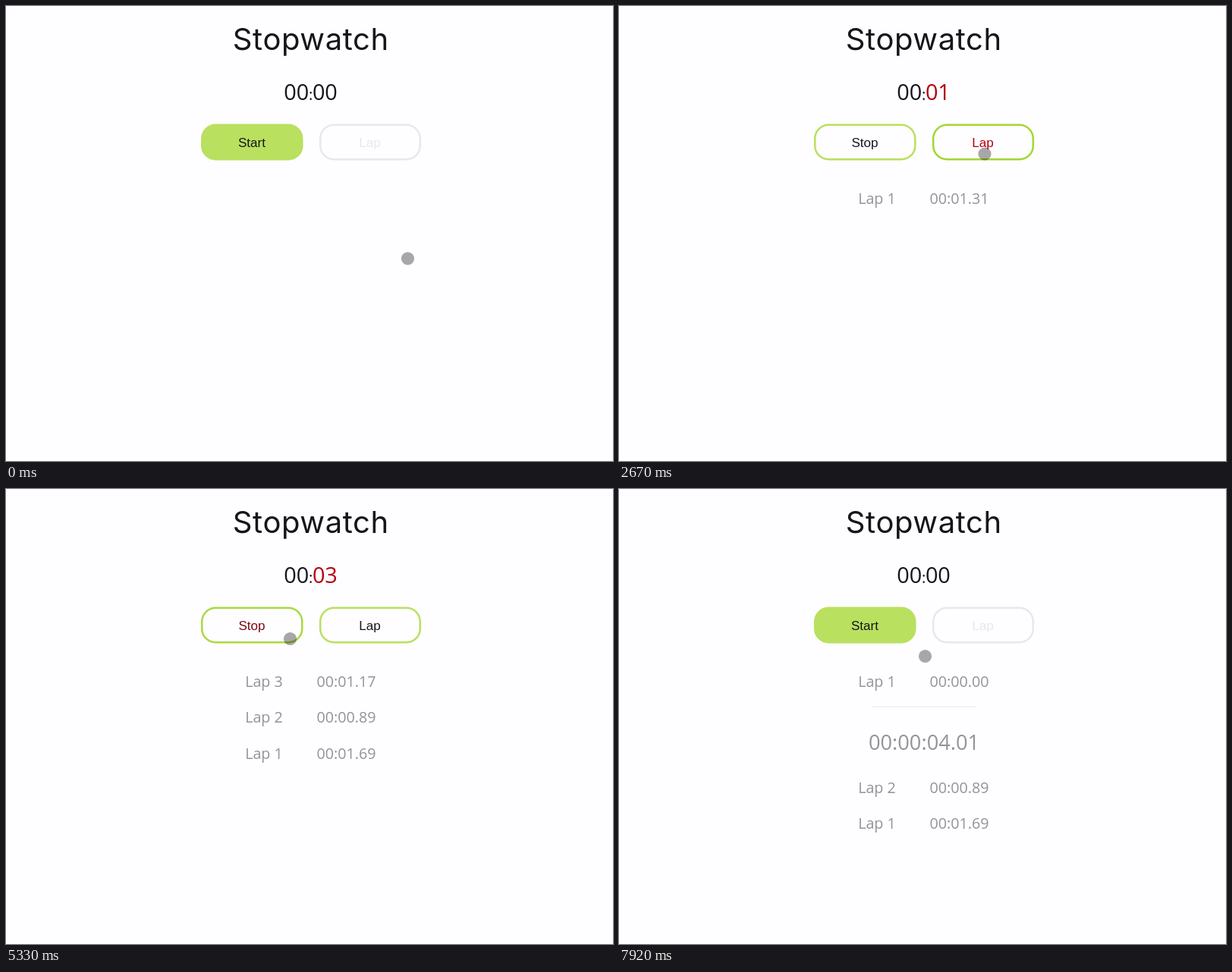
An HTML page for the animation above (8000 ms loop, 800 by 600 pixels).

```html
<!DOCTYPE html>
<html lang="en">
<head>
<meta charset="utf-8">
<title>Stopwatch</title>
<style>
  html, body { margin: 0; width: 100%; height: 100%; overflow: hidden; background: #fefdff; }
  svg { display: block; width: 800px; height: 600px; }
  text { font-family: "Open Sans", "Noto Sans", sans-serif; fill: #16151a; white-space: pre; }
  .title { font: 400 40px Inter, sans-serif; letter-spacing: .015em; text-anchor: middle; }
  .clock { font-size: 28.8px; }
  .colon { font-size: 20px; }
  .button rect { stroke-width: 2.5; }
  .button text { font: 17.1px "Liberation Sans", Arial, sans-serif; text-anchor: middle; }
  .laps text { font-size: 19.7px; fill: #949397; }
  .laps .total { font-size: 27.2px; }
</style>
</head>
<body>
<svg viewBox="0 0 800 600">
  <rect width="800" height="600" fill="#fefdff"/>
  <rect x="799" width="1" height="600" fill="#f7f6f9"/>
  <text class="title" x="401.8" y="58">Stopwatch</text>

  <text class="clock" x="366.3" y="124">00</text>
  <text class="colon" x="399" y="124">:</text>
  <text class="clock" id="seconds" x="403.9" y="124">00</text>

  <g class="button" id="main">
    <rect x="258.25" y="156.75" width="132" height="45.4" rx="18"/>
    <text x="324" y="185.6"></text>
  </g>
  <g class="button" id="side">
    <rect x="414.2" y="156.75" width="131.6" height="45.4" rx="18"/>
    <text x="479.6" y="185.6"></text>
  </g>

  <g class="laps">
    <g class="row"><text x="315.2"></text><text x="409.6"></text></g>
    <g class="row"><text x="315.2"></text><text x="409.6"></text></g>
    <g class="row"><text x="315.2"></text><text x="409.6"></text></g>
    <g id="summary">
      <rect x="334" y="286.5" width="136" height="1.2" fill="#ecebef"/>
      <text class="total" x="329" y="344">00:00:04.01</text>
    </g>
  </g>
  <circle id="pointer" r="8.6"/>
</svg>

<script>
const LOOP = 8000, FPS = 12, FADE = 300;
const START = 1228, STOP = 5605, RESET = 7010, RATE = 0.915;
const LAPS = [1.69, 0.89, 1.42];
const ROW_TOP = 260.5, ROW_GAP = 47.6, SUMMARY_HEIGHT = 92.4;

const PAPER = [254, 253, 255], INK = [22, 21, 26], RED = [178, 0, 14], PALE = [232, 231, 235];
const LIGHT = [185, 224, 95], HOVER = [164, 214, 50], PRESS = [149, 188, 44];

// A look is [fill, edge, ink].
const looks = {
  idle: [LIGHT, LIGHT, INK],
  hover: [HOVER, HOVER, INK],
  press: [PRESS, PRESS, INK],
  outline: [PAPER, LIGHT, INK],
  outlineHover: [PAPER, HOVER, RED],
  disabled: [PAPER, PALE, PALE]
};

// Each button fades to a new look from the given time on.
const mainStates = [
  [0, "idle"], [750, "hover"], [1000, "press"], [START + 30, "outlineHover"],
  [1740, "outline"], [5150, "outlineHover"], [STOP, "hover"], [5950, "idle"]
];
const sideStates = [
  [0, "disabled"], [START + 30, "outline"], [2100, "outlineHover"], [3250, "outline"],
  [3550, "outlineHover"], [4350, "outline"], [STOP, "idle"], [6300, "hover"], [RESET, "disabled"]
];

// The pointer rests between moves; dip bends a move downwards.
const home = { x: 529.5, y: 333 };
const moves = [
  { from: 70, to: 1000, x: 373.5, y: 194.3, dip: 0 },
  { from: 1700, to: 2270, x: 482, y: 195, dip: 28 },
  { from: 3180, to: 3330, x: 491.5, y: 205.5, dip: 0 },
  { from: 3450, to: 3650, x: 482, y: 195, dip: 0 },
  { from: 4250, to: 5320, x: 374.5, y: 197.5, dip: 12 },
  { from: 5850, to: 6650, x: 452, y: 197.5, dip: 14 },
  { from: 7050, to: 7400, x: 424.5, y: 227.5, dip: 0 },
  { from: 7590, to: 7910, x: 403.5, y: 220.5, dip: 0 }
];

const $ = id => document.getElementById(id);
const mix = (a, b, k) => a + (b - a) * k;
const mixColor = (a, b, k) => a.map((v, i) => mix(v, b[i], k));
const rgb = color => `rgb(${color.map(Math.round)})`;
const pad = n => String(n).padStart(2, "0");

function ease(t, from, to) {
  const k = Math.max(0, Math.min(1, (t - from) / (to - from)));
  return k * k * (3 - 2 * k);
}

function lookAt(states, t) {
  return states.reduce((look, [time, name]) => {
    const k = ease(t, time, time + FADE);
    return look.map((color, i) => mixColor(color, looks[name][i], k));
  }, looks[states[0][1]]);
}

function pointerAt(t) {
  return moves.reduce((at, move) => {
    const k = ease(t, move.from, move.to);
    return {
      x: mix(at.x, move.x, k),
      y: mix(at.y, move.y, k) + move.dip * Math.sin(Math.PI * k)
    };
  }, home);
}

function lapTime(seconds) {
  const hundredths = Math.floor(seconds * 100 + 1e-6);
  return `00:${pad(Math.floor(hundredths / 100))}.${pad(hundredths % 100)}`;
}

function lapEntries(t, elapsed) {
  if (t < START) return [];
  const entries = [];
  let left = elapsed;
  for (let i = 0; i < LAPS.length && left >= 0; i++) {
    entries.unshift({ n: i + 1, time: Math.min(left, LAPS[i]) });
    left -= LAPS[i];
  }
  if (t >= RESET) entries[0] = { n: 1, time: 0 };
  return entries;
}

function drawButton(id, label, states, t) {
  const [box, text] = $(id).children;
  const [fill, edge, ink] = lookAt(states, t).map(rgb);
  box.setAttribute("fill", fill);
  box.setAttribute("stroke", edge);
  text.style.fill = ink;
  text.textContent = label;
}

const rows = [...document.querySelectorAll(".row")];

function drawLaps(entries, archived) {
  rows.forEach((row, i) => {
    const entry = entries[i];
    row.style.display = entry ? "" : "none";
    if (!entry) return;
    const [name, value] = row.children;
    name.textContent = `Lap ${entry.n}`;
    value.textContent = lapTime(entry.time);
    const y = ROW_TOP + i * ROW_GAP + (archived && i ? SUMMARY_HEIGHT : 0);
    row.setAttribute("transform", `translate(0 ${y})`);
  });
  $("summary").style.display = archived ? "" : "none";
}

function draw(t) {
  const running = t >= START && t < STOP;
  const stopped = t >= STOP && t < RESET;
  const elapsed = Math.max(0, Math.min(t, STOP) - START) * RATE / 1000;
  const red = ease(t, START, START + FADE) - ease(t, STOP, STOP + FADE * 2);

  $("seconds").textContent = pad(t < RESET ? Math.floor(elapsed) : 0);
  $("seconds").style.fill = rgb(mixColor(INK, RED, red));
  drawButton("main", running ? "Stop" : "Start", mainStates, t);
  drawButton("side", stopped ? "Reset" : "Lap", sideStates, t);
  drawLaps(lapEntries(t, elapsed), t >= RESET);

  const { x, y } = pointerAt(t);
  const pressed = [START, STOP, RESET].some(click => Math.abs(t - click) < 60);
  $("pointer").setAttribute("cx", x);
  $("pointer").setAttribute("cy", y);
  $("pointer").setAttribute("fill-opacity", pressed ? 0.45 : 0.34);
}

const begin = performance.now();
function tick() {
  const t = (performance.now() - begin) % LOOP;
  const step = Math.floor((t + 4) * FPS / 1000) % (LOOP * FPS / 1000);
  draw(step * 1000 / FPS);
  requestAnimationFrame(tick);
}
tick();
</script>
</body>
</html>
```
